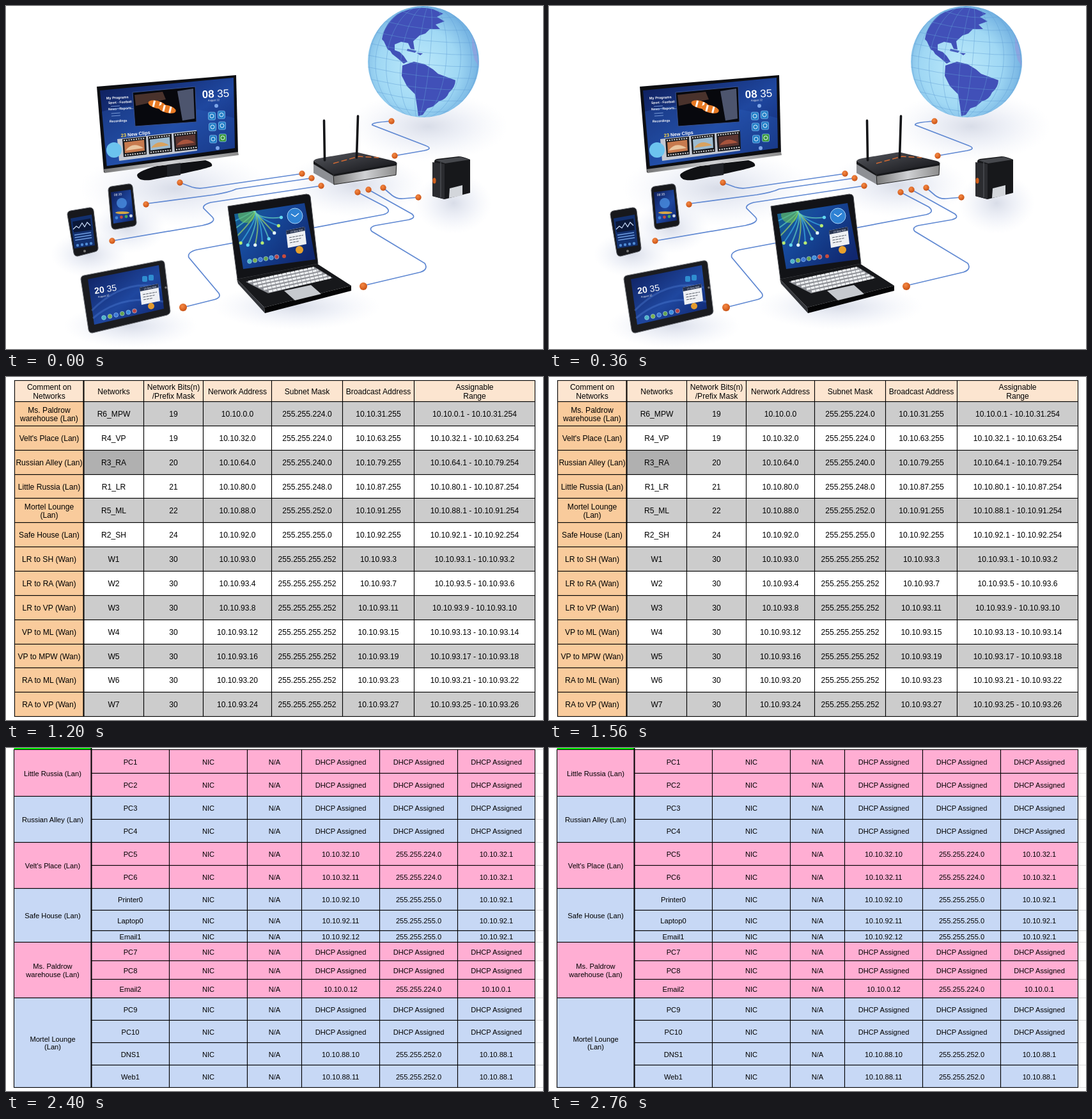
Recreate the animation shown at these times as an HTML page. Size 840 px wide and 536 px high, loop 3 s.

```html
<!DOCTYPE html>
<html lang="en">
<head>
<meta charset="utf-8">
<title>Network design slides</title>
<style>
  html, body { margin: 0; width: 100%; height: 100%; overflow: hidden; background: #fff; }
  svg { display: block; }
  text { font-family: "Liberation Sans", Arial, sans-serif; white-space: pre; }
</style>
</head>
<body>
<svg id="stage" width="840" height="536" viewBox="0 0 840 536">
  <defs>
    <radialGradient id="shade"><stop offset="0" stop-color="#a3adc8" stop-opacity=".42"/><stop offset=".5" stop-color="#c3cce4" stop-opacity=".26"/><stop offset="1" stop-color="#dbe1f0" stop-opacity="0"/></radialGradient>
    <radialGradient id="ocean" cx=".45" cy=".55" r=".6"><stop offset="0" stop-color="#bdeafb"/><stop offset=".6" stop-color="#a0d8f4"/><stop offset="1" stop-color="#69a9dd"/></radialGradient>
    <radialGradient id="knob" cx=".4" cy=".35" r=".7"><stop offset="0" stop-color="#f78a44"/><stop offset="1" stop-color="#c54d10"/></radialGradient>
    <linearGradient id="desk" x2="1" y2="1"><stop offset="0" stop-color="#0d1c58"/><stop offset=".55" stop-color="#1f479f"/><stop offset="1" stop-color="#0c2168"/></linearGradient>
    <linearGradient id="rays" x2="1" y2=".7"><stop offset="0" stop-color="#14678f"/><stop offset=".4" stop-color="#174a9c"/><stop offset="1" stop-color="#10276f"/></linearGradient>
    <linearGradient id="steel" x2="1"><stop offset="0" stop-color="#777"/><stop offset=".5" stop-color="#d0d1d4"/><stop offset="1" stop-color="#8c8c8c"/></linearGradient>
    <linearGradient id="black" x2="1" y2="1"><stop offset="0" stop-color="#55575d"/><stop offset=".6" stop-color="#2a2b30"/><stop offset="1" stop-color="#0d0d10"/></linearGradient>
    <clipPath id="ball"><circle cx="653" cy="87" r="87"/></clipPath>
    <clipPath id="lcd"><path d="M357 325L467 308L484 396L371 411Z"/></clipPath>
  </defs>
</svg>
<script>
const stage = document.getElementById('stage');
const STEP = 600, LOOP = 3000;

const poly = (pts, fill, extra = '') => `<polygon points="${pts}" fill="${fill}" ${extra}/>`;
const path = (d, fill, extra = '') => `<path d="${d}" fill="${fill}" ${extra}/>`;
const disc = (x, y, r, fill, extra = '') => `<circle cx="${x}" cy="${y}" r="${r}" fill="${fill}" ${extra}/>`;
const oval = (x, y, rx, ry, fill, extra = '') => `<ellipse cx="${x}" cy="${y}" rx="${rx}" ry="${ry}" fill="${fill}" ${extra}/>`;
const rect = (x, y, w, h, fill, extra = '') => `<rect x="${x}" y="${y}" width="${w}" height="${h}" fill="${fill}" ${extra}/>`;
const text = (x, y, s, size, extra = '') => `<text x="${x}" y="${y}" font-size="${size}" ${extra}>${s}</text>`;
const tilted = (x, y, s, size, deg, extra = '') =>
  text(x, y, s, size, `fill="#fff" transform="rotate(${deg} ${x} ${y})" ${extra}`);
const span = (n, f) => Array.from({ length: n }, (_, i) => f(i)).join('');

// ---------- Devices around a globe ----------
function globe() {
  const line = 'stroke="#629fd4" stroke-width=".7" stroke-opacity=".65"';
  const land = '#4150b8';
  return disc(653, 87, 87, 'url(#ocean)') + '<g clip-path="url(#ball)">' +
    path('M588 52Q592 28 612 13Q640 -2 668 5L684 12L674 17L686 24L672 29L679 36L663 36L656 43L647 46L637 55L639 68L633 67L629 58L618 56L608 60L608 69L616 72L622 78L628 87L622 90L613 82L604 75L601 70L597 68L591 55Z', land) +
    path('M620 93L638 87L655 91L668 99L676 106L703 116Q703 127 693 135Q689 146 677 149L668 157L659 160L652 170L645 172L643 157L640 138L627 125L619 109Z', land) +
    path('M628 67L642 70L640 73L627 70ZM642 73L652 74L648 77Z', land) +
    path('M729 46Q736 60 740 95L733 84L729 66Z', '#8ba5e0') +
    '<g transform="rotate(6 653 87)">' +
    span(5, i => oval(653, 87, 87 * Math.sin((i + .35) * .31), 90, 'none', line)) +
    span(9, i => {
      const y = 12 + i * 18.5, w = Math.sqrt(Math.max(0, 7569 - (y - 87) ** 2));
      return path(`M${653 - w} ${y}Q653 ${y + 10} ${653 + w} ${y}`, 'none', line);
    }) + '</g></g>';
}

function television() {
  const icons = [[322, 172], [337, 170], [323, 189], [338, 187], [324, 208], [339, 206]];
  const strip = i => {
    const x = 182 + i * 40, y = 208 - i * 4.3;
    return poly(`${x},${y} ${x + 37},${y - 4} ${x + 38},${y + 24} ${x + 2},${y + 28}`, '#18191d') +
      poly(`${x + 3},${y + 5} ${x + 34},${y + 1} ${x + 35},${y + 18} ${x + 4},${y + 22}`, ['#c77a4e', '#9dbbd0', '#5a3430'][i]) +
      path(`M${x + 5} ${y + 18}Q${x + 16} ${y + 3} ${x + 33} ${y + 14}Z`, ['#e9c6a0', '#d8a25f', '#a8543d'][i]) +
      path(`M${x + 2} ${y + 2.3}l34 -3.7M${x + 4} ${y + 25}l33 -3.6`, 'none', 'stroke="#ddd" stroke-width="2" stroke-dasharray="2 1.8"');
  };
  return path('M205 264Q207 258 236 250L312 241Q324 245 322 250Q318 254 226 272Q206 274 205 264Z', '#101114') +
    poly('252,242 273,239 273,264 252,267', '#202227') +
    poly('142,126 360,108 363,230 153,260', '#0d0e12') +
    poly('153,255 363,228 364,233 154,261', 'url(#steel)') +
    poly('147,132 356,112 358,222 158,250', 'url(#desk)') +
    path('M150 165Q230 140 357 175L358 222L157 250Z', '#2c62bd', 'opacity=".3"') +
    poly('198,135 296,126 298,181 202,188', '#07080d', 'stroke="#36508f"') +
    poly('201,139 245,134 250,146 203,156', '#5b3d34', 'opacity=".8"') +
    poly('268,133 293,129 295,176 276,179', '#6c7797', 'opacity=".7"') +
    span(2, i => `<g transform="rotate(14 ${236 + i * 16} ${155 + i * 6})">` +
      oval(236 + i * 16, 154 + i * 7, 14, 6, '#e87a24') +
      path(`M${231 + i * 16} ${149 + i * 7}v10M${241 + i * 16} ${149 + i * 7}v10`, 'none', 'stroke="#fff" stroke-width="3"') + '</g>') +
    tilted(157, 146, 'My Programs', 5.5, -3, 'font-weight="bold"') +
    tilted(160, 153, 'Sport - Football', 5, -3, 'font-weight="bold"') +
    tilted(160, 163, 'News - Reports..', 5, -3, 'font-weight="bold"') +
    tilted(162, 182, 'Recordings', 5, -3, 'font-weight="bold"') +
    span(4, i => path(`M${164 + i * .3} ${157 + i * 4 + (i > 1 ? 3 : 0)}l14 -1`, 'none', 'stroke="#8fb0ea" stroke-width=".8"')) +
    tilted(180, 205, '<tspan fill="#ffd84a">23</tspan> New Clips', 7.5, -6, 'font-weight="bold"') +
    poly('174,208 298,194 299,226 177,242', '#c3c8d2') + span(3, strip) +
    disc(169, 225, 12, '#6cc3ee') +
    tilted(307, 144, '<tspan font-weight="bold">08</tspan> 35', 17, -3) +
    tilted(316, 149, 'August 22', 4, -3) +
    disc(329, 156, 3, '#7ea6e8') + disc(331, 222, 3, '#7ea6e8') +
    icons.map(([x, y], i) => rect(x - 5.5, y - 6, 11, 12, i == 5 ? '#3f9a3c' : '#237fc6', 'rx="2" stroke="#82bdf0" stroke-width=".8"') +
      disc(x, y, 3, 'none', 'stroke="#e4f2ff"')).join('');
}

function phones() {
  return path('M160 288Q160 283 165 282L192 278Q197 278 198 283L204 338Q204 343 199 344L171 349Q166 349 165 344Z', '#17181c', 'stroke="#55585e"') +
    poly('164,291 195,287 200,335 168,340', 'url(#desk)') + disc(181, 308, 8, '#4a8de0', 'opacity=".8"') +
    tilted(169, 297, '08:35', 5, -7) + oval(182, 323, 11, 2, '#d6a945') +
    span(4, i => disc(173 + i * 7.5, 331 - i, 2.4, ['#3f86d8', '#c74b3c', '#47a65a', '#d0d8e6'][i])) +
    path('M96 326Q96 321 101 320L131 315Q136 315 137 320L144 378Q144 383 139 384L112 391Q107 391 106 386Z', '#17181c', 'stroke="#55585e"') +
    poly('101,332 134,326 139,374 107,379', '#12306f') +
    poly('104,337 132,332 134,350 106,354', '#0b1838') +
    path('M105 349l5 -5 4 3 5 -8 4 6 4 -7 5 5', 'none', 'stroke="#cfe2ff" stroke-width="1.2"') +
    span(3, i => path(`M${107 + i * .6} ${358 + i * 4}l26 -4`, 'none', 'stroke="#6f9ddf" stroke-width="1.4"')) +
    span(4, i => disc(112 + i * 7, 374 - i, 2.2, '#4f8bd4')) + disc(123, 383, 2, '#777');
}

const note = (x, y) => poly(`${x},${y} ${x + 29},${y - 6} ${x + 32},${y + 21} ${x + 3},${y + 27}`, '#eef0f4') +
  poly(`${x},${y} ${x + 29},${y - 6} ${x + 29.7},${y} ${x + .7},${y + 6}`, '#24314f') +
  tilted(x + 7, y + 3.5, '23 New Mail', 3.6, -11) +
  span(3, i => path(`M${x + 5 + i * .5} ${y + 11 + i * 4}l${22 - i * 4} ${-4 + i * .8}`, 'none', 'stroke="#555b66" stroke-dasharray="4 1"'));

const dock = (n, x, y, dx, dy) => span(n, i =>
  disc(x + i * dx, y + i * dy, 3.4, ['#4bb5c5', '#7cb14d', '#3d78d8', '#66a24f', '#3d8ede', '#b84545'][i % 6], 'stroke="#9cc7ef" stroke-width=".7"'));

function tablet() {
  return path('M117 427Q117 422 122 421L241 398Q247 397 248 402L257 477Q257 481 252 483L135 511Q130 511 129 506Z', '#1b1c20', 'stroke="#777a80"') +
    poly('128,427 239,405 247,473 138,498', 'url(#desk)') +
    path('M134 476Q185 425 242 440M136 488Q180 450 246 462', 'none', 'stroke="#5f8ee8" stroke-opacity=".3" stroke-width="3"') +
    tilted(139, 450, '<tspan font-weight="bold">20</tspan> 35', 14, -9) +
    tilted(144, 456, 'August 22', 4, -9) +
    rect(213, 422, 8, 9, '#2f8dd0', 'rx="2"') + rect(223, 420, 8, 9, '#2f8dd0', 'rx="2"') +
    note(209, 440) + dock(6, 153, 487, 9.6, -2.1) + disc(227, 469, 5, '#e39a2d') + disc(250, 440, 1.8, '#777');
}

function laptop() {
  return path('M347 313L470 294Q475 294 476 298L488 403L362 427Z', '#121317', 'stroke="#4a4b50"') +
    poly('357,325 467,308 484,396 371,411', 'url(#rays)') + '<g clip-path="url(#lcd)">' +
    span(11, i => {
      const a = .25 + i * .24, x = 384 + Math.cos(a) * 48, y = 316 + Math.sin(a) * 58;
      return path(`M384 316Q${395 + i} ${335 - i * 2} ${x} ${y}`, 'none', `stroke="${['#69d8c1', '#3fb7ea', '#a6de63'][i % 3]}" stroke-width="2" stroke-opacity=".65"`) +
        disc(x, y, 2.6, ['#63d7f2', '#b8ec72', '#e6fbff'][i % 3]);
    }) + disc(376, 326, 13, '#71cd56', 'opacity=".55"') + '</g>' +
    disc(452, 328, 12, '#2f82d4', 'stroke="#a7d2f6"') + path('M446 325l6 4 6 -5', 'none', 'stroke="#fff" stroke-width="1.3"') +
    note(438, 351) + dock(6, 381, 399, 8.5, -1.4) + disc(459, 381, 6, '#e8a02c') + disc(435, 391, 3, '#c74b3c') +
    poly('361,427 487,403 540,437 404,471', '#17181b') +
    poly('361,427 404,471 405,480 363,434', '#33353a') +
    poly('404,471 540,437 540,445 405,480', '#050506') +
    poly('375,431 483,408 511,425 410,449', '#8b8d93') +
    span(5, i => path(`M${379 + i * 8} ${431 + i * 3.8}L${482 + i * 6.5} ${409 + i * 3.8}`, 'none', 'stroke="#eceef0" stroke-width="3.3" stroke-dasharray="6 .8"')) +
    poly('435,445 477,436 493,450 452,460', '#c6c9ce');
}

function router() {
  return poly('481,244 513,262 513,279 481,261', '#8d8f94') + poly('481,242 513,262 513,266 481,247', '#17181b') +
    poly('512,262 611,245 610,264 513,279', 'url(#steel)', 'stroke="#222"') +
    poly('512,262 611,245 611,249 513,266', '#17181b') +
    path('M481 242Q483 239 490 238L543 229Q547 228 551 229L606 242Q611 243 611 246L512 263Z', 'url(#black)') +
    path('M512 246L552 235L583 237', 'none', 'stroke="#d46a32" stroke-width="1.5" stroke-dasharray="9 4"') +
    path('M497.500 179L498.500 241M550.500 172L548.500 237', 'none', 'stroke="#131417" stroke-width="3.6" stroke-linecap="round"');
}

function drive() {
  return path('M670 243Q670 240 674 239L708 235Q714 235 726 240L726 292L686 302L667 297Z', '#17181b') +
    poly('671,241 711,236 725,240 687,246', '#46484d') + poly('667,244 686,247 686,302 667,297', '#2b2c30') +
    path('M680 244V299', 'none', 'stroke="#5b5d62"') + poly('694,285 714,280 714,296 693,300', '#d3d6db');
}

function devices() {
  const cables = [
    'M603 180Q570 182 573 186L656 218Q669 223 654 226L608 234',
    'M272 276L291 283Q301 286 312 284L463 262',
    'M219 309L325 295Q350 291 360 286L478 269',
    'M166 367L307 343Q330 338 323 330L309 316Q307 311 320 307L493 281',
    'M277 471L325 459Q337 456 333 449L286 393Q283 385 298 381L590 326Q604 322 594 314L550 291',
    'M559 437L648 416Q661 412 655 402L572 352Q567 346 578 343L630 334Q642 331 635 325L567 287',
    'M645 299L621 301Q612 302 604 296L590 284'
  ];
  const ends = [[603, 180], [608, 234], [463, 262], [478, 269], [493, 281], [272, 276], [219, 310], [166, 367],
    [550, 291], [567, 287], [590, 284], [645, 299]];
  const shades = [[660, 188, 125, 55], [265, 285, 150, 60], [545, 280, 110, 50], [700, 308, 60, 48], [455, 470, 130, 36], [195, 500, 105, 34], [130, 388, 60, 36], [190, 347, 60, 40]];
  return shades.map(([x, y, w, h]) => oval(x, y, w, h, 'url(#shade)')).join('') + globe() +
    cables.map(d => path(d, 'none', 'stroke="#5f88d2" stroke-width="1.7"')).join('') +
    television() + phones() + tablet() + laptop() + router() + drive() +
    ends.map(([x, y]) => disc(x, y, 4.7, 'url(#knob)')).join('') +
    disc(277, 471, 6, 'url(#knob)') + disc(559, 438, 6, 'url(#knob)') + oval(670, 273, 2.6, 4.5, '#d2601c');
}

// ---------- Topology ----------
const edge = 'stroke="#2f6f84" stroke-width=".8"';
const art = {
  server: () => poly('-11,-16 -6,-20 12,-20 8,-16', '#a9d2de', edge) + rect(-11, -16, 19, 35, '#4b96ac', edge) +
    poly('8,-16 12,-20 12,15 8,19', '#2d7288') + path('M-8 -11h13M-8 -7h13M-8 9h13', 'none', 'stroke="#b9dde6"'),
  pc: () => poly('-14,7 11,7 16,13 -11,13', '#7ab2c3', edge) + poly('-12,-13 9,-13 9,5 -12,5', '#d4e8ee', edge) +
    rect(-9.500, -10.500, 16, 12, '#4d9cb3') + poly('9,-13 12,-10 12,6 9,5', '#4b8ea2') + rect(-5, 5, 9, 3, '#2f7489'),
  switch: () => poly('-18,1 -8,-9 19,-9 10,1', '#7bb8ca', edge) + poly('-18,1 10,1 10,9 -18,9', '#468fa6', edge) +
    poly('10,1 19,-9 19,-1 10,9', '#2d7389') + path('M-8 -3h13M-4 -6h13', 'none', 'stroke="#e9f7fb" stroke-width="1.5"'),
  router: () => path('M-16 -5V5A16 7 0 0 0 16 5V-5Z', '#3f87a0', edge) + oval(0, -5, 16, 7, '#83bccd', edge) +
    path('M-9 -8L9 -2M9 -8L-9 -2', 'none', 'stroke="#fff" stroke-width="1.6"'),
  laptop: () => poly('-10,-14 16,-12 13,4 -13,4', '#4d9cb3', 'stroke="#b9dbe5" stroke-width="1.5"') + poly('-13,4 13,4 8,13 -20,13', '#73afc1', edge),
  printer: () => poly('-16,-3 -8,-9 16,-9 10,-3', '#a6d0dc', edge) + poly('-16,-3 10,-3 10,7 -16,7', '#4b96ac', edge) + poly('10,-3 16,-9 16,1 10,7', '#2d7288')
};
const model = { server: 'Server-PT', pc: 'PC-PT', switch: '4730-16KX', router: '5384', laptop: 'Laptop-PT', printer: 'Printer-PT' };
const drop = { server: 26, pc: 22, switch: 15, router: 18, laptop: 20, printer: 15 };
const nodes = {
  Email1: ['server', 93, 47], Laptop0: ['laptop', 16, 84], Printer0: ['printer', 8, 147], S4: ['switch', 111, 133],
  R2_SH: ['router', 186, 167], PC3: ['pc', 430, 41], PC4: ['pc', 493, 71], S2: ['switch', 403, 126], R3_RA: ['router', 373, 198],
  PC9: ['pc', 719, 52], PC10: ['pc', 787, 72], S6: ['switch', 691, 129], DNS1: ['server', 823, 142], Web1: ['server', 765, 203],
  R5_ML: ['router', 644, 205], R1_LR: ['router', 145, 271], S1: ['switch', 67, 328], PC1: ['pc', -15, 412], PC2: ['pc', 45, 405],
  R4_VP: ['router', 359, 326], S3: ['switch', 309, 383], PC5: ['pc', 244, 434], PC6: ['pc', 378, 434],
  R6_MPW: ['router', 641, 286], S5: ['switch', 649, 362], PC7: ['pc', 575, 389], PC8: ['pc', 639, 442], Email2: ['server', 722, 423]
};
// Each wire: ends, then how far the status mark sits from either end.
const wires = [
  ['Email1', 'S4', 40, 29], ['Laptop0', 'S4', 29, 26], ['Printer0', 'S4', 27, 29], ['S4', 'R2_SH', 29, 24],
  ['S2', 'PC3', 28, 29], ['S2', 'PC4', 30, 18], ['S2', 'R3_RA', 29, 27], ['S6', 'PC9', 31, 34], ['S6', 'PC10', 33, 16],
  ['S6', 'DNS1', 30, 10], ['S6', 'Web1', 30, 35], ['S6', 'R5_ML', 28, 29], ['R1_LR', 'S1', 30, 30], ['S1', 'PC2', 33, 29],
  ['R4_VP', 'S3', 27, 30], ['S3', 'PC5', 28, 30], ['S3', 'PC6', 29, 21], ['R6_MPW', 'S5', 23, 30],
  ['S5', 'PC7', 30, 13], ['S5', 'PC8', 33, 29], ['S5', 'Email2', 29, 40]
];
const trunks = [
  ['R2_SH', 'R1_LR', 22, 22], ['R1_LR', 'R3_RA', 21, 23], ['R1_LR', 'R4_VP', 21, 23], ['R3_RA', 'R4_VP', 22, 23],
  ['R3_RA', 'R5_ML', 22, 23, 'L508 205L510 196'], ['R4_VP', 'R5_ML', 21, 23, 'L504 268L498 262'], ['R4_VP', 'R6_MPW', 21, 22, 'L502 309L498 300']
];
const notes = {
  'DHCP Assigned': [[430, 18], [496, 49], [723, 31], [790, 49], [42, 450], [576, 450], [640, 499]],
  'Dynamic Routing': [[196, 144], [94, 277], [697, 286]],
  'Static Routing': [[348, 178], [615, 184], [406, 343]],
  'Static IP': [[242, 411], [380, 411], [-9, 188]],
  'floating route': [[456, 215]], 'User: farolind': [[17, 60]], 'User: dovi': [[578, 434]], 'User: lurn': [[638, 487]],
  'N/A: 10.10.64.0/20': [[479, 119]], 'N/A: 10.10.93.0/30': [[166, 215]], 'N/A: 10.10.93.4/30': [[271, 227]],
  'N/A: 10.10.93.8/30': [[237, 295]], 'N/A: 10.10.93.24/30': [[373, 257]], 'N/A: 10.10.93.20/30': [[455, 200]],
  'N/A: 10.10.93.12/30': [[518, 249]], 'N/A: 10.10.93.16/30': [[538, 295]], 'N/A: 10.10.32.0/19': [[316, 453]],
  'N/A: 10.10.0.0/19': [[740, 503]], 'N/A: 10.10.80.0/21': [[-22, 472]]
};

function topology() {
  const mark = (x, y) => poly(`${x - 5.5},${y + 4.5} ${x},${y - 5} ${x + 5.5},${y + 4.5}`, '#6cbd45', 'stroke="#4f9a38" stroke-width=".8"');
  let lines = '', marks = '';
  const link = (color, [a, b, da, db, jog = '']) => {
    const [, x0, y0] = nodes[a], [, x1, y1] = nodes[b], len = Math.hypot(x1 - x0, y1 - y0);
    const at = d => mark(x0 + (x1 - x0) * d / len, y0 + (y1 - y0) * d / len);
    lines += path(`M${x0} ${y0}${jog}L${x1} ${y1}`, 'none', `stroke="${color}" stroke-width="2.3" stroke-linejoin="round"`);
    marks += at(da) + at(len - db);
  };
  wires.forEach(w => link('#0a0a0a', w));
  trunks.forEach(w => link('#d8201c', w));
  lines += path('M67 328L-20 370', 'none', 'stroke="#0a0a0a" stroke-width="2.3"');
  marks += mark(1, 361);
  const label = (x, y, s) => text(x, y + 2.9, s, 8, 'text-anchor="middle"');
  const tags = Object.entries(notes).flatMap(([s, spots]) => spots.map(([x, y]) => {
    const w = s.length * 4.15 + 3;
    return rect(x - w / 2, y - 6.5, w, 13, '#f7f9fb') + label(x, y, s);
  })).join('');
  const list = Object.entries(nodes);
  return lines + list.map(([, [kind, x, y]]) => `<g transform="translate(${x} ${y})">${art[kind]()}</g>`).join('') + marks + tags +
    list.map(([name, [kind, x, y]]) => label(x + 1, y + drop[kind], model[kind]) + label(x + 1, y + drop[kind] + 10.500, name)).join('');
}

// ---------- Tables ----------
const crisp = markup => `<g transform="translate(.5 .5)">${markup}</g>`;
function cell(x0, y0, x1, y1, s, fill, size) {
  const rows = s.split('\n'), lead = size * 1.1;
  const base = (y0 + y1) / 2 + .6 + size * .36 - (rows.length - 1) * lead / 2;
  return rect(x0, y0, x1 - x0, y1 - y0, fill, 'stroke="#000" stroke-width="1.1"') +
    rows.map((r, i) => text((x0 + x1) / 2, base + i * lead, r, size, 'text-anchor="middle"')).join('');
}
const upright = (x, y0, y1) => path(`M${x} ${y0}V${y1}`, 'none', 'stroke="#000" stroke-width="2"');
const ruler = ys => ys.map(y => path(`M828 ${y}H840`, 'none', 'stroke="#dcdcdc"')).join('');

const PALMER = 'Ms. Paldrow\nwarehouse (Lan)', VELT = "Velt's Place (Lan)", MORTEL = 'Mortel Lounge\n(Lan)';
const ALLEY = 'Russian Alley (Lan)', LITTLE = 'Little Russia (Lan)', SAFE = 'Safe House (Lan)';
const ip = (c, d) => `10.10.${c}.${d}`;
const mask = bits => bits > 24 ? '255.255.255.252' : `255.255.${256 - 2 ** (24 - bits)}.0`;

function subnets() {
  const xs = [13, 121, 215, 308, 415, 526, 638, 827];
  const yAt = r => Math.round(38 + r * 37.85);
  const head = ['Comment on\nNetworks', 'Networks', 'Network Bits(n)\n/Prefix Mask', 'Nerwork Address', 'Subnet Mask', 'Broadcast Address', 'Assignable\nRange'];
  const lans = [[PALMER, 'R6_MPW', 19, 0], [VELT, 'R4_VP', 19, 32], [ALLEY, 'R3_RA', 20, 64],
    [LITTLE, 'R1_LR', 21, 80], [MORTEL, 'R5_ML', 22, 88], [SAFE, 'R2_SH', 24, 92]]
    .map(([name, id, bits, c]) => {
      const last = c + 2 ** (24 - bits) - 1;
      return [name, id, String(bits), ip(c, 0), mask(bits), ip(last, 255), `${ip(c, 1)} - ${ip(last, 254)}`];
    });
  const wans = ['LR to SH', 'LR to RA', 'LR to VP', 'VP to ML', 'VP to MPW', 'RA to ML', 'RA to VP'].map((name, i) => {
    const d = i * 4;
    return [name + ' (Wan)', 'W' + (i + 1), '30', ip(93, d), mask(30), ip(93, d + 3), `${ip(93, d + 1)} - ${ip(93, d + 2)}`];
  });
  return crisp(head.map((s, c) => cell(xs[c], 5, xs[c + 1], 38, s, '#fce5d0', 12.1)).join('') +
    [...lans, ...wans].map((row, r) => row.map((s, c) => {
      const fill = !c ? '#f9cb9c' : s == 'R3_RA' ? '#b0b0b0' : r % 2 ? '#fff' : '#cccccc';
      return cell(xs[c], yAt(r), xs[c + 1], yAt(r + 1), s, fill, 12.1);
    }).join('')).join('') + upright(121, 5, 530));
}

const cols = [12, 133, 255, 377, 462, 584, 706, 827];

function interfaces() {
  const ports = ['g0/0', 's0/0/0', 's0/0/1', 's0/1/0', 's0/1/1'];
  const groups = [
    [VELT, 'R4_VP', 19, 32, [['R1_LR', 10], ['R3_RA', 26], ['R5_ML', 13], ['R6_MPW', 17]]],
    [ALLEY, 'R3_RA', 20, 64, [['R1_LR', 6], ['R4_VP', 25], ['R5_ML', 21]]],
    [LITTLE, 'R1_LR', 21, 80, [['R2_SH', 1], ['R3_RA', 5], ['R4_VP', 9]]],
    [MORTEL, 'R5_ML', 22, 88, [['R3_RA', 22], ['R4_VP', 14]]]
  ];
  let y = 2, out = rect(12, -1, 815, 3, '#b3b1b1') + rect(12, -1, 121, 3, '#0f0') + ruler(Array.from({ length: 15 }, (_, i) => 2 + i * 36));
  groups.forEach(([name, id, bits, c, peers], g) => {
    const fill = g % 2 ? '#b3b1b1' : '#fff', end = y + 36 * (peers.length + 1);
    out += cell(12, y, 133, end, name, '#00ff00', 11.15) + cell(133, y, 255, end, id, fill, 11.15);
    [['Default\nGateway'], ...peers].forEach(([to, d], r) => {
      const row = [ports[r], to, r ? ip(93, d) : ip(c, 1), mask(r ? 30 : bits), 'N/A'];
      out += row.map((s, k) => cell(cols[k + 2], y, cols[k + 3], y + 36, s, fill, 11.15)).join('');
      y += 36;
    });
  });
  return crisp(out + upright(133, -1, 536));
}

function hosts() {
  const ys = [2, 39, 75, 111, 147, 183, 219, 253, 285, 303, 332, 361, 390, 425, 460, 495, 530];
  const groups = [
    [LITTLE, 21, 80, 'PC1 PC2'], [ALLEY, 20, 64, 'PC3 PC4'], [VELT, 19, 32, 'PC5:10 PC6:11'],
    [SAFE, 24, 92, 'Printer0:10 Laptop0:11 Email1:12'], [PALMER, 19, 0, 'PC7 PC8 Email2:12'], [MORTEL, 22, 88, 'PC9 PC10 DNS1:10 Web1:11']
  ];
  let r = 0, out = rect(12, -1, 121, 3, '#0f0') + ruler(ys);
  groups.forEach(([name, bits, c, list], g) => {
    const fill = g % 2 ? '#c7d8f5' : '#ffaed3', items = list.split(' ');
    out += cell(12, ys[r], 133, ys[r + items.length], name, fill, 11.15);
    items.forEach(item => {
      const [host, d] = item.split(':');
      const net = d ? [ip(c, d), mask(bits), ip(c, 1)] : Array(3).fill('DHCP Assigned');
      out += [host, 'NIC', 'N/A', ...net].map((s, k) => cell(cols[k + 1], ys[r], cols[k + 2], ys[r + 1], s, fill, 11.15)).join('');
      r++;
    });
  });
  return crisp(out + upright(133, -1, 530));
}

// ---------- Slide show ----------
[devices, topology, subnets, interfaces, hosts].forEach((draw, i) => {
  const slide = document.createElementNS('http://www.w3.org/2000/svg', 'g');
  slide.innerHTML = rect(0, 0, 840, 536, '#fff') + draw();
  stage.append(slide);
  slide.animate([
    { opacity: 1, offset: 0, easing: 'step-end' },
    { opacity: 0, offset: STEP / LOOP, easing: 'step-end' },
    { opacity: 0, offset: 1 }
  ], { duration: LOOP, delay: i * STEP - LOOP, iterations: Infinity });
});
</script>
</body>
</html>
```
